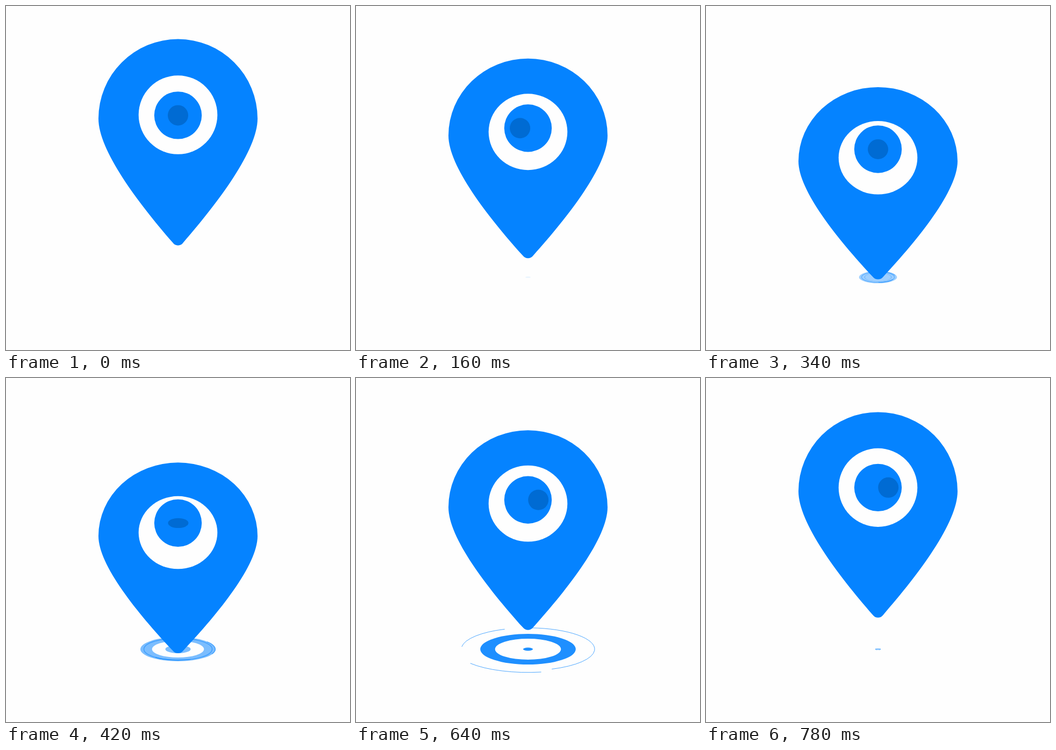
An HTML page with a canvas that plays this animation: 640x640 px, repeating every 800 ms.

```html
<!DOCTYPE html>
<html lang="en">
<head>
<meta charset="utf-8">
<title>Bouncing map pin</title>
<style>
  html, body { margin: 0; width: 100%; height: 100%; overflow: hidden; background: #fefefe; }
  canvas { display: block; }
</style>
</head>
<body>
<canvas id="stage" width="640" height="640"></canvas>
<script>
const ctx = document.getElementById('stage').getContext('2d');
const LOOP = 800, CX = 320, GROUND = 504.5, TIP = 448, TILT = 0.32;
const WHITE = '#fefefe', BLUE = '#0583ff', DARK = '#006bd3';
const PIN = new Path2D('M172 209.5A148 148 0 0 1 468 209.5C468 268 396 364 329.5 440.5' +
  'C325 447 315 447 310.5 440.5C244 364 172 268 172 209.5Z');

const ramp = (t, from, to) => Math.min(1, Math.max(0, (t - from) / (to - from)));
const ease = (t, from, to) => {
  const s = ramp(t, from, to);
  return s * s * (3 - 2 * s);
};

function oval(x, y, rx, ry, color) {
  ctx.beginPath();
  ctx.ellipse(x, y, rx, ry, 0, 0, 2 * Math.PI);
  ctx.fillStyle = color;
  ctx.fill();
}

function arc(r, from, to) {
  ctx.beginPath();
  ctx.ellipse(CX, GROUND, r, r * TILT, 0, from * Math.PI / 180, to * Math.PI / 180);
  ctx.stroke();
}

function drawRipple(t) {
  ctx.globalAlpha = ramp(t, 117, 700);

  const dot = 25.5 * (ease(t, 133, 233) - ease(t, 333, 850));
  if (dot > 0) oval(CX, GROUND, dot, dot * TILT, BLUE);

  const ring = 107.5 * (ease(t, 200, 567) - ease(t, 580, 810));
  if (ring > 0) {
    ctx.beginPath();
    for (const r of [ring, ring * 0.69]) {
      ctx.moveTo(CX + r, GROUND);
      ctx.ellipse(CX, GROUND, r, r * TILT, 0, 0, 2 * Math.PI);
    }
    ctx.fillStyle = BLUE;
    ctx.fill('evenodd');
  }

  // Thin arcs spin outwards, shorten and fade away
  const line = 124 * ease(t, 200, 635);
  const width = 1.5 * (1 - ramp(t, 540, 750));
  if (line > 0 && width > 0) {
    const spin = (t - 560) * 0.5375;
    ctx.strokeStyle = BLUE;
    ctx.lineWidth = width;
    arc(line, 273, Math.min(633, 503 - (t - 560) * 0.9125));
    arc(line, 143 + spin, 206 + spin);
    arc(line * 1.09, 36 + spin, 99 + spin);
  }
  ctx.globalAlpha = 1;
}

function drawPin(t) {
  const away = Math.abs(t - 400);
  const drop = 67 * (1 - ease(away, 0, 400));
  const squash = 0.92 + 0.08 * away / 400;

  ctx.save();
  ctx.translate(0, TIP + drop);
  ctx.scale(1, squash);
  ctx.translate(0, -TIP);
  ctx.fillStyle = BLUE;
  ctx.fill(PIN);
  oval(CX, 202.5, 73.3, 73.3, WHITE);
  ctx.restore();

  const eyeY = 203.4 + drop;
  const look = 19.2 * (ease(t, 400, 633) - ease(t, 0, 233) + ease(t, 233, 333));
  const open = 0.33 + 0.67 * ease(away, 0, 67);
  oval(CX, eyeY, 44.2, 44.2, BLUE);
  oval(CX + look, eyeY, 19, 19 * open, DARK);
}

function draw(now) {
  const t = now % LOOP;
  ctx.fillStyle = WHITE;
  ctx.fillRect(0, 0, 640, 640);
  drawRipple(t);
  drawPin(t);
}

const start = performance.now();
function tick() {
  draw(performance.now() - start);
  requestAnimationFrame(tick);
}
tick();
</script>
</body>
</html>
```
